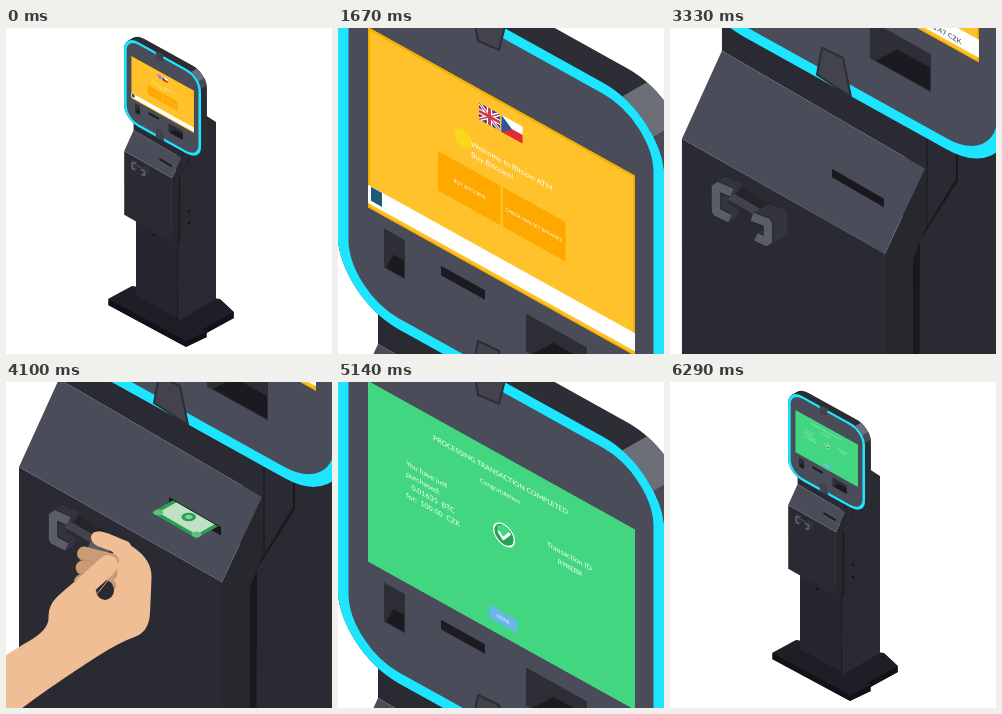
An HTML page with a canvas for the animation above (7.69 s loop, 326 px wide and 326 px high).

```html
<!DOCTYPE html>
<html lang="en">
<head>
<meta charset="utf-8">
<title>Bitcoin kiosk</title>
<style>
html, body { margin: 0; width: 100%; height: 100%; overflow: hidden; background: #fff; }
canvas { display: block; width: 326px; height: 326px; }
</style>
</head>
<body>
<canvas id="stage"></canvas>
<script>
const LOOP = 7690, STEP = 30, SIZE = 326, SKEW = 0.556, ZOOM = 4.25;
const dpr = window.devicePixelRatio || 1;
const canvas = document.getElementById('stage');
canvas.width = canvas.height = Math.round(SIZE * dpr);
const ctx = canvas.getContext('2d');

// Cameras: translation and scale of the kiosk
const FAR = [118.2, 28, 1 / ZOOM], SCREEN = [0, 0, 1], SLOT = [13, -319, 1];

const mix = (a, b, u) => a + (b - a) * u;
const ease = u => 1.13 * u + 0.64 * u * u - 0.77 * u * u * u;
const tick = (t, from) => from + Math.floor((t - from) / STEP) * STEP;
// Points measured in the wide view, in kiosk space
const wide = pts => pts.map((p, i) => (p - FAR[i % 2]) * ZOOM);
const shift = (pts, dx, dy) => pts.map((p, i) => p + (i % 2 ? dy : dx));

function trace(pts) {
  ctx.beginPath();
  for (let i = 0; i < pts.length; i += 2) ctx.lineTo(pts[i], pts[i + 1]);
}
function poly(fill, pts) {
  trace(pts);
  ctx.fillStyle = fill;
  ctx.fill();
}
function line(color, width, pts, join = 'round') {
  trace(pts);
  ctx.strokeStyle = color;
  ctx.lineWidth = width;
  ctx.lineCap = join === 'round' ? 'round' : 'butt';
  ctx.lineJoin = join;
  ctx.stroke();
}
// Smooth shape guided by a few control points
function blob(fill, pts) {
  ctx.beginPath();
  ctx.moveTo(pts[0], pts[1]);
  for (let i = 2; i < pts.length - 2; i += 2) {
    ctx.quadraticCurveTo(pts[i], pts[i + 1], (pts[i] + pts[i + 2]) / 2, (pts[i + 1] + pts[i + 3]) / 2);
  }
  ctx.fillStyle = fill;
  ctx.fill();
}
function rect(color, x, y, w, h) {
  ctx.fillStyle = color;
  ctx.fillRect(x, y, w, h);
}
function rounded(color, x, y, w, h, r) {
  ctx.beginPath();
  ctx.roundRect(x, y, w, h, r);
  ctx.fillStyle = color;
  ctx.fill();
}
function disc(color, x, y, rx, ry = rx) {
  ctx.beginPath();
  ctx.ellipse(x, y, rx, ry, 0, 0, Math.PI * 2);
  ctx.fillStyle = color;
  ctx.fill();
}
// Upright panel seen at an angle, from its top left corner
function slab(color, x, y, w, h, k = SKEW) {
  poly(color, [x, y, x + w, y + k * w, x + w, y + k * w + h, x, y + h]);
}
function text(str, x, y, size, color = '#fff', align = 'left') {
  ctx.font = `${size}px Lato, "Open Sans", sans-serif`;
  ctx.textAlign = align;
  ctx.fillStyle = color;
  ctx.fillText(str, x, y);
}
const label = (str, x, y, size) => text(str, x, y, size, '#fff', 'center');

const FRONT = '#2a2a32', SIDE = '#27272e', SEAM = '#18181d', GREY = '#4a4c59';

function drawBody() {
  // Base plate
  const base = wide([102, 271, 126, 258, 214, 271, 228, 284, 197, 301, 201, 303, 180, 313]);
  for (let h = 26; h > 0; h -= 2) poly('#121319', shift(base, 0, h));
  poly('#1e1f26', base);
  // Cabinet side and lower door
  poly('#2a2a32', wide([170, 130, 180, 100, 196, 85, 210, 94, 210, 271, 172, 293]));
  for (const y of [183, 195]) disc('#0f1014', ...wide([183, y]), 4, 5);
  slab('#26272e', ...wide([130, 180]), 178, 370);
  slab('#15161b', ...wide([130, 187]), 178, 4);
  line('#15161b', 3, wide([171.7, 205, 171.7, 292]));
  disc('#0f1014', ...wide([147.5, 207]), 5);
  // Neck and the gap behind the upper box
  poly(FRONT, [40, 274, 40, 316, 243, 434, 240, 499, 275, 444, 275, 354]);
  poly(SEAM, [231, 524, 240, 500, 274, 444, 274, 404, 276, 404, 276, 446, 238, 506, 237, 789, 231, 789]);
  line('#1d1d23', 1.5, [245, 404, 245, 492]);
  // Upper box
  poly(SIDE, [243, 434, 244, 492, 231, 524, 231, 776, 203, 790, 203, 519]);
  slab(FRONT, 0, 404, 203, 271, 0.566);
  poly(GREY, [40, 316, 243, 434, 203, 519, 0, 404]);
  slab(SEAM, 150, 434, 52, 8.5, 0.577);
  drawHandle();
}

// Two facing brackets joined by a bar
function drawHandle() {
  const bracket = (pts, depth) => {
    for (let i = depth; i > 0; i--) line('#34353e', 9, shift(pts, i, -0.58 * i), 'bevel');
    line('#24252b', 10.5, pts, 'bevel');
    line('#5a5c67', 8.5, pts, 'bevel');
  };
  const left = [50, 458, 34, 451, 34, 477, 48, 484];
  line('#24252b', 12, [48, 453, 96, 480]);
  line('#42434e', 8, [46, 460, 84, 482]);
  bracket(left, 8);
  bracket([70, 482, 86, 488, 86, 508, 74, 502], 15);
}

const FACE = { x: 5, y: -87, w: 316, h: 349, r: 56 };
const DEPTH = [25, -28];

function drawFace() {
  const { x, y, w, h, r } = FACE, edge = 5.5, R = r + edge;
  for (let i = 12; i >= 0; i--) {
    rounded('#2d2e35', x - edge + DEPTH[0] * i / 12, y - edge + DEPTH[1] * i / 12, w + 2 * edge, h + 2 * edge, R);
  }
  // Lit facets of the top right corner
  const facet = (color, from, to) => {
    const arc = [];
    for (let i = 0; i <= 4; i++) {
      const a = mix(from, to, i / 4) * Math.PI / 180;
      arc.push([x + w - r + R * Math.cos(a), y + r + R * Math.sin(a)]);
    }
    const back = arc.map(p => shift(p, ...DEPTH)).reverse();
    poly(color, [...arc, ...back].flat());
  };
  facet('#6d6f78', -72, -35);
  facet('#484a54', -35, -10);
  rounded(GREY, x, y, w, h, r);
  ctx.strokeStyle = '#1de5ff';
  ctx.lineWidth = 2 * edge;
  ctx.stroke();
}

// Opening with a darker floor
function recess(x, y, w, h, rise) {
  rect('#2d2e36', x, y, w, h);
  poly('#1a1a20', [x + 0.1 * w, y + h - 1, x + 0.45 * w, y + h - rise, x + w - 1, y + h - rise, x + w - 1, y + h - 1]);
}

function drawMonitor(page) {
  ctx.save();
  ctx.transform(1, SKEW, 0, 1, 0, 0);
  drawFace();
  recess(46, 175, 21, 39, 18);
  recess(188, 181, 61, 38, 24);
  rect('#1b1b21', 103, 180.5, 44, 9.5);
  ctx.beginPath();
  ctx.rect(30, -18, 267, 181);
  ctx.clip();
  page();
  ctx.restore();
  // Tabs over the ring
  const tab = [140, 313, 161, 323, 169, 362, 135, 340];
  for (const pts of [tab, tab.map((p, i) => i % 2 ? 326 - p + 0.9 * (tab[i - 1] - 140) : p)]) {
    poly('#42434d', pts);
    line('#2c2d35', 2, [...pts, pts[0], pts[1]]);
  }
}

function yellow() {
  rect('#f4b000', 30, -18, 267, 181);
  rect('#ffc22b', 32, -15, 263, 176);
  rect('#fff', 30, 140, 267, 18);
  rect('#1d5a75', 33, 140.5, 11, 14);
}

function flags() {
  const x = 141, y = -4, w = 21, h = 17, x2 = x + w + 1.5;
  ctx.save();
  ctx.beginPath();
  ctx.rect(x, y, w, h);
  ctx.clip();
  rect('#31427f', x, y, w, h);
  for (const [color, thin, thick] of [['#fff', 3.5, 5.5], ['#d43a48', 1.2, 3]]) {
    line(color, thin, [x, y, x + w, y + h]);
    line(color, thin, [x + w, y, x, y + h]);
    line(color, thick, [x, y + h / 2, x + w, y + h / 2]);
    line(color, thick, [x + w / 2, y, x + w / 2, y + h]);
  }
  ctx.restore();
  rect('#fff', x2, y, w, h / 2);
  rect('#dc2c35', x2, y + h / 2, w, h / 2);
  poly('#2d5599', [x2, y, x2 + w / 2, y + h / 2, x2, y + h]);
}

function welcomePage() {
  yellow();
  flags();
  disc('#f9d71c', 125, 41, 9);
  text('Welcome to Bitcoin ATM', 133, 44, 7.4);
  text('Buy Bitcoins!', 133, 54.5, 7.4);
  ['BUY BITCOINS', 'CHECK WALLET BALANCE'].forEach((name, i) => {
    rect('#ffa800', 100 + 65 * i, 67.5, 62.5, 39.5);
    label(name, 131.5 + 64.5 * i, 89.5, 4.7);
  });
}

function miniKiosk() {
  rect('#33343c', 184.5, 60, 62, 80);
  poly('#999ca3', [200, 126, 213, 109, 266, 111, 262, 140, 204, 140]);
  rounded('#5b5d65', 185, -13, 97, 102, [0, 24, 14, 0]);
  ctx.strokeStyle = '#fff';
  ctx.lineWidth = 2.5;
  ctx.stroke();
  line('#2b2c34', 2, [186.5, -12, 186.5, 140], 'bevel');
  rounded('#bfc3ca', 194.5, 0, 80, 49, 5);
  rect('#25262d', 196, 77, 4, 9);
  rect('#25262d', 218, 76, 12, 4);
  rect('#3a3b43', 250, 74, 14, 13);
  rect('#2fa35a', 240, 122, 15, 12);
  rect('#8fd0a0', 243, 124, 9, 7);
}

function insertPage() {
  yellow();
  miniKiosk();
  [['Inserted cash so far:', '0.00   CZK'], ['which equals to:', '0   BTC']].forEach(([name, value], i) => {
    const y = 33 + 34 * i;
    rect('#ffa800', 32, y, 116, 14);
    poly('#ffa800', [118, y + 14, 148, y + 14, 133, y + 21]);
    text(name, 35.5, y - 4.5, 5.9);
    text(value, 146, y + 10.5, 6.4, '#fff', 'right');
  });
  text('INSERT CASH', 141, 2, 7);
  text('Please insert cash you want to exchange to bitcoins', 95.5, 15.5, 5.9);
  text('Destination address', 36.5, 95.5, 5.9);
  rect('#6db5ea', 36.5, 98, 207, 12);
  label('1Kq7Y4t9fQb2aoxRbACuthNa1EPswXTe', 139, 106.5, 6.3);
  rect('#f2604a', 248.5, 103, 41, 14);
  label('CANCEL', 269, 112, 3.8);
  text('exchange rate', 154.5, 153.5, 7.3, '#f59a2e');
  text('1 BTC = 6116.47 CZK', 212.5, 154.5, 6.9, '#333');
}

function donePage() {
  rect('#41d67f', 30, -18, 267, 181);
  text('PROCESSING TRANSACTION COMPLETED', 95, 5, 6.9);
  text('Congratulation', 142, 21, 6.1);
  ['You have just', 'purchased:', '   0.01635  BTC', 'for:  100.00  CZK'].forEach((row, i) => {
    text(row, 68, 45.5 + 10.6 * i, 7.1);
  });
  text('Transaction ID', 209, 48, 7.1);
  label('R9REBR', 232, 59, 6.6);
  disc('#fff', 166, 60.5, 11);
  disc('#2c9f58', 166, 60.5, 9.6);
  poly('#41d67f', [159, 55, 165, 51, 171, 52, 172, 56, 165, 65, 160, 62]);
  line('#fff', 2.6, [161, 60.5, 165, 65, 171.5, 56.5]);
  rect('#6cb5e8', 151, 138.5, 28, 13);
  label('DONE', 165, 147, 4.5);
}

const SKIN = '#efbe94', SHADE = '#c99b76';

// Three curled fingers, top one first
function fingers(x, y, length) {
  for (let i = 0; i < 3; i++) {
    const fx = x - 1.5 * i, fy = y + 14 * i;
    line('#b98b67', 14, [fx, fy + 1, fx + length, fy + 8 - 2 * i]);
    line(SHADE, 13, [fx, fy, fx + length, fy + 7 - 2 * i]);
  }
}

function pointingHand() {
  line(SKIN, 58, [-60, 84, -260, 235]);
  line(SKIN, 18, [1, 9, -26, 48]);
  disc(SKIN, -44, 70, 38, 34);
  fingers(-36, 52, 20);
  line(SKIN, 18, [-66, 68, -40, 40]);
}

function fistHand() {
  blob(SKIN, [
    -240, 430, 0, 272, 43, 248, 42, 224, 58, 208, 98, 176, 112, 170, 84, 162, 86, 148,
    108, 152, 146, 178, 145, 212, 143, 250, 114, 260, 70, 288, 15, 326, -200, 490]);
  fingers(78, 171, 28);
  disc('#2a2a31', 99, 208, 9, 10);
  line(SKIN, 20, [58, 228, 80, 203, 102, 183]);
  line('#d9a67d', 1, [112, 186, 103, 197, 90, 213]);
  line(SKIN, 15, [94, 157, 118, 166]);
}

// Drawn from the edge that enters last; the slot hides the rest
function banknote(x, y) {
  ctx.save();
  trace([-200, -93, 600, 368, 600, 900, -200, 900]);
  ctx.clip();
  ctx.transform(0.866, 0.5, 0.866, -0.495, x, y);
  rect('#2b9d55', -26, 0, 52, 40);
  rect('#bfe2c4', -22, 4, 44, 32);
  for (const px of [-22, 22]) for (const py of [4, 36]) disc('#5fbf7d', px, py, 4);
  disc('#2b9d55', 0, 17, 6);
  disc('#8ccf9d', 0, 17, 3);
  ctx.restore();
}

// Position along [time, x, y] keys
function along(keys, t) {
  const i = Math.max(1, keys.findIndex(k => t <= k[0]));
  const [t0, x0, y0] = keys[i - 1], [t1, x1, y1] = keys[i];
  const u = (t - t0) / (t1 - t0);
  return [mix(x0, x1, u), mix(y0, y1, u)];
}

const TAP = [[2140, -30, 350], [2350, 132, 158], [2410, 132, 158], [2620, -40, 380]];
const RELEASE = 3950, SWALLOWED = 4370, GRIP = [52, -28];
const PAY = [[3560, -165, 180], [3860, ...GRIP], [RELEASE, ...GRIP], [4100, 0, 0], [SWALLOWED, -205, 230]];

function drawHand(pose, [x, y]) {
  ctx.save();
  ctx.translate(x, y);
  pose();
  ctx.restore();
}

function drawPayment(t) {
  const hand = along(PAY, t);
  const left = (SWALLOWED - Math.max(t, RELEASE)) / 270;
  const [dx, dy] = t < RELEASE ? [hand[0] - GRIP[0], hand[1] - GRIP[1]] : [0, 0];
  banknote(189 - 21 * left + dx, 131.5 + 12 * left + dy);
  drawHand(fistHand, hand);
}

const MOVES = [[1400, FAR, SCREEN], [3120, SCREEN, SLOT], [4870, SLOT, SCREEN], [6020, SCREEN, FAR]];

function camera(t) {
  const [start, from, to] = MOVES.findLast(m => t >= m[0]) || [0, FAR, FAR];
  const u = ease(Math.min(1, (Math.floor((t - start) / STEP) + 1) / 10));
  return from.map((v, i) => mix(v, to[i], u));
}

function draw(t) {
  ctx.setTransform(dpr, 0, 0, dpr, 0, 0);
  rect('#fff', 0, 0, SIZE, SIZE);
  const [x, y, scale] = camera(t);
  ctx.save();
  ctx.translate(x, y);
  ctx.scale(scale, scale);
  drawBody();
  drawMonitor(t < 2380 ? welcomePage : t < 4870 ? insertPage : donePage);
  ctx.restore();
  if (t >= 2170 && t < 2620) drawHand(pointingHand, along(TAP, tick(t, 2170)));
  if (t >= 3590 && t < SWALLOWED) drawPayment(tick(t, 3590));
}

const begin = performance.now();
function frame() {
  draw((performance.now() - begin) % LOOP);
  requestAnimationFrame(frame);
}
frame();
</script>
</body>
</html>
```
